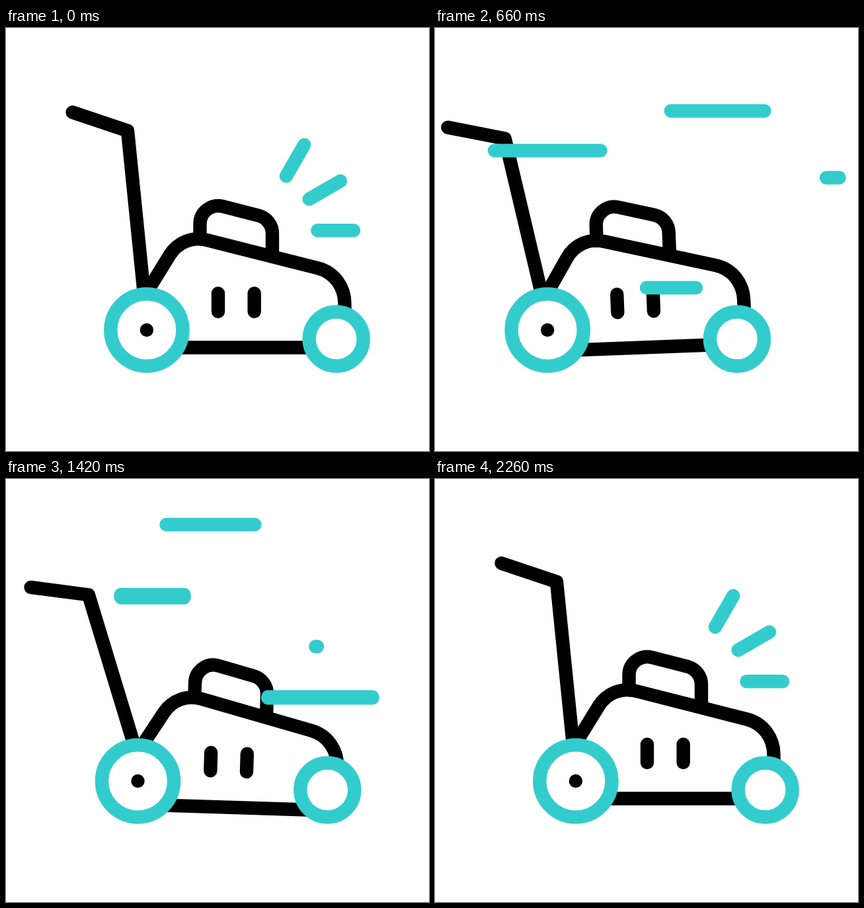
These frames come from a looping animation (640x640 px, 2.4 s). An HTML page with a canvas:

```html
<!DOCTYPE html>
<html>
<head>
<meta charset="utf-8">
<style>
  html, body { margin: 0; height: 100%; overflow: hidden; background: #fff; }
  canvas { display: block; }
</style>
</head>
<body>
<canvas id="stage" width="640" height="640"></canvas>
<script>
const ctx = document.getElementById('stage').getContext('2d');
const { sin, cos, min, max, PI } = Math;
const LOOP = 2400, RIDE = 2200, STREAK = 199.5;
const TEAL = '#33cccc', BLACK = '#000';

const body = new Path2D(`M203 416 L248 343 C260 324 282 315 305 321 L472 363.5
  C497 370 512.5 392 512.5 417 V460 M213 483.5 H500
  M293.5 319.5 V296.5 A27.5 27.5 0 0 1 327.9 269.9 L382.5 283.9 A28 28 0 0 1 403 311 V346
  M321 401.5 V429 M375.7 401.5 V429`);
const handle = new Path2D('M100.5 127.5 L184 155.5 L210.5 418');

// Eased progress from 0 to 1 between two times.
function ease(t, start, end) {
  const u = min(1, max(0, (t - start) / (end - start)));
  return (1 - cos(PI * u)) / 2;
}

// Back, forth, back again and home.
const drive = t => -46.5 * ease(t, 0, 590) + 79.3 * ease(t, 590, 1095)
  - 70 * ease(t, 1095, 1635) + 37.2 * ease(t, 1635, 2180);
const tilt = t => -2.3 * sin(2 * PI * t / RIDE);
const bounce = t => 17 * sin(PI * t / RIDE) ** 2 * sin(2 * PI * (t - 1185) / 1050);
const lean = t => -5 * ease(t, 0, 600) - 10.8 * ease(t, 600, 1120) + 15.8 * ease(t, 1120, RIDE);

function rotateAbout(x, y, degrees) {
  ctx.translate(x, y);
  ctx.rotate(degrees * PI / 180);
  ctx.translate(-x, -y);
}

function circle(x, y, r) {
  ctx.beginPath();
  ctx.arc(x, y, r, 0, 2 * PI);
  ctx.fill();
}

function wheel(x, y, r) {
  ctx.fillStyle = '#fff';
  circle(x, y, r);
  ctx.stroke();
}

function drawMower(t) {
  const ride = min(t, RIDE);
  ctx.save();
  ctx.translate(drive(t), 0);

  ctx.save();
  ctx.strokeStyle = BLACK;
  ctx.translate(0, bounce(ride));
  rotateAbout(357, 482, tilt(ride));
  ctx.stroke(body);
  rotateAbout(215, 408, lean(ride));
  ctx.stroke(handle);
  ctx.restore();

  ctx.strokeStyle = TEAL;
  wheel(212.9, 457, 54.6);
  wheel(499.7, 470.5, 41);
  ctx.fillStyle = BLACK;
  circle(212.9, 457, 10.2);
  ctx.restore();
}

// A horizontal line from the current origin, hidden while it has no length to show.
function dash(from, to) {
  ctx.beginPath();
  ctx.moveTo(from, 0);
  ctx.lineTo(to, 0);
  ctx.stroke();
}

function drawWind(t) {
  function streak(x, y, start, stretch = 1) {
    const head = ease(t, start, start + 450);
    const tail = ease(t, start + 280, start + 700);
    if (head <= 0 || tail >= 1) return;
    ctx.save();
    ctx.translate(x, y);
    ctx.scale(1, stretch);
    dash(-STREAK * head, -STREAK * tail);
    ctx.restore();
  }
  streak(555.5, 125.5, 230);
  streak(258.5, 185.5, 327);
  streak(395, 393, 472);
  streak(611.5, 226.5, 570);
  streak(560.5, 330.5, 1095, 1.08);
  streak(376.3, 69, 1146);
  streak(269.8, 177.2, 1201, 1.23);
  streak(471, 253.5, 1388);
}

// Three rays around one centre, leaving outward and growing back.
function drawSparks(t) {
  const gone = ease(t, 0, 270), back = ease(t, 1880, 2150);
  if (gone === 1 && back === 0) return;
  const inner = back ? 95 : 95 + 54.6 * gone;
  const outer = back ? 95 + 54.6 * back : 149.6;
  for (let ray = 0; ray < 3; ray++) {
    ctx.save();
    ctx.translate(376.4, 306.3);
    ctx.rotate(-ray * PI / 6);
    dash(inner, outer);
    ctx.restore();
  }
}

function draw(t) {
  ctx.clearRect(0, 0, 640, 640);
  ctx.lineWidth = 20.4;
  ctx.lineCap = ctx.lineJoin = 'round';
  drawMower(t);
  ctx.strokeStyle = TEAL;
  drawWind(t);
  drawSparks(t);
}

const begin = performance.now();
function tick() {
  draw((performance.now() - begin) % LOOP);
  requestAnimationFrame(tick);
}
tick();
</script>
</body>
</html>
```
